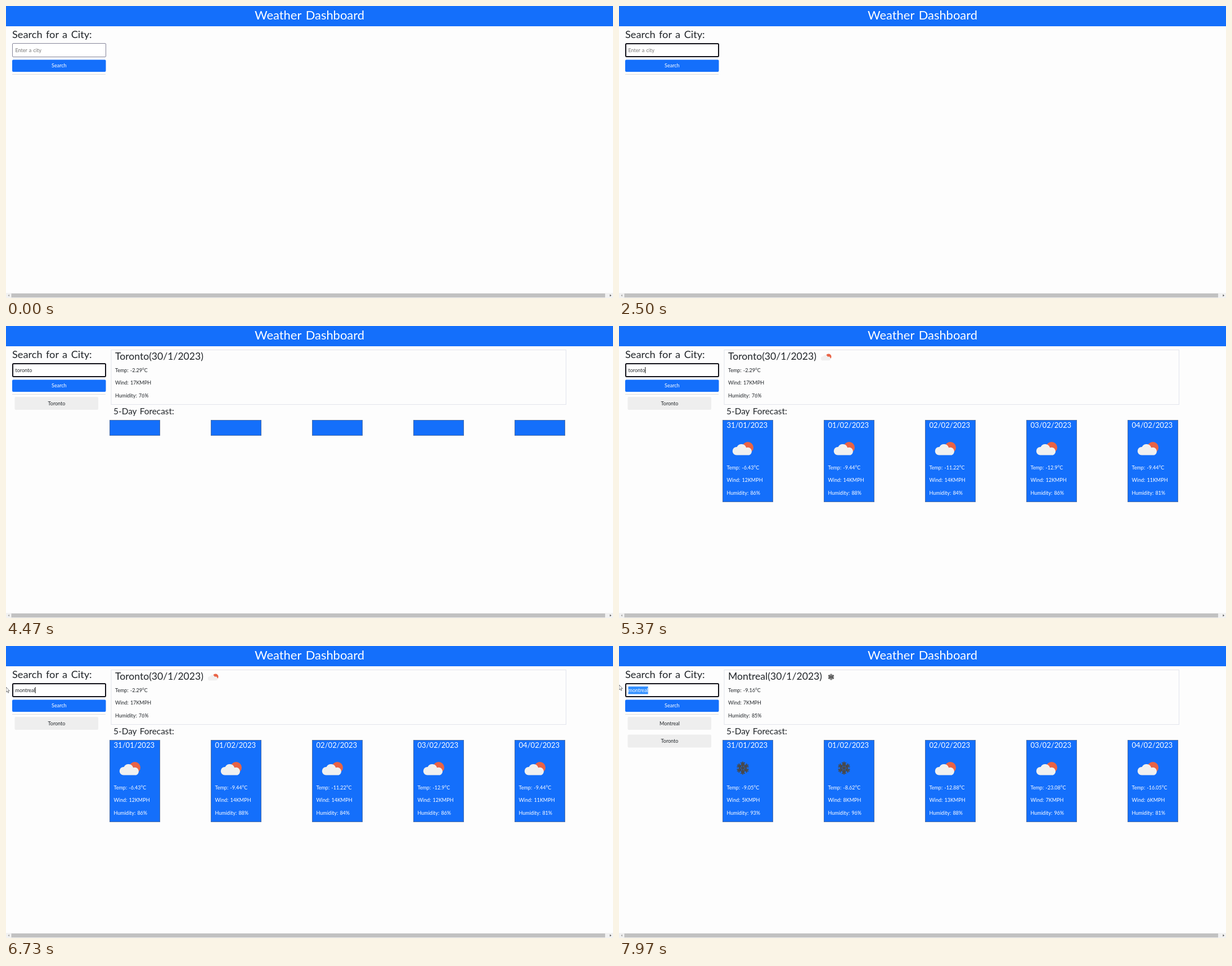
An HTML page for the animation above (8 s loop, 1079 px wide and 519 px high).

```html
<!DOCTYPE html>
<html lang="en">
<head>
<meta charset="utf-8">
<title>Weather Dashboard</title>
<style>
  html, body { margin: 0; width: 100%; height: 100%; overflow: hidden; background: #fdfdfd; }
  svg { display: block; width: 1079px; height: 519px; }
  text { font: 9px Lato, "Open Sans", sans-serif; word-spacing: .1em; fill: #212529; white-space: pre; }
  .mid { text-anchor: middle; }
  .white { fill: #fff; }
  .h1 { font-size: 21.9px; }
  .h2 { font-size: 18.2px; }
  .title { font-size: 17.6px; }
  .h3 { font-size: 15.4px; }
  .date { font-size: 13.1px; }
  .blue { fill: #146ffb; }
</style>
</head>
<body>
<svg viewBox="0 0 1079 519">
  <defs>
    <g id="cloud">
      <circle cx="9" cy="-1" r="10" fill="#e96345"/>
      <path d="M-11 12.500a7 7 0 0 1 0-14.500h.6a9 9 0 0 1 16.600 1.300 6.800 6.800 0 0 1 5.300 13.200z" fill="#f0f0f0"/>
    </g>
    <g id="snow" fill="none" stroke="#484848" stroke-width="2"></g>
  </defs>
  <rect class="blue" width="1079" height="36"/>
  <text class="h1 mid white" x="539.500" y="23.500">Weather Dashboard</text>
  <text class="h2" x="11" y="57">Search for a City:</text>
  <rect id="field" fill="#fff" rx="1.500"/>
  <rect id="mark" y="72" height="13.500" fill="#3390ff"/>
  <text id="typed" x="16.500" y="81.500"></text>
  <rect id="caret" y="73" width="1" height="11" fill="#111"/>
  <rect class="blue" x="11" y="95.500" width="166.500" height="21.500" rx="2"/>
  <text class="mid white" x="94.300" y="109">Search</text>
  <path d="M11 121.500H177" stroke="#dedede"/>
  <g id="results"></g>
  <rect y="510" width="1079" height="9" fill="#f1f1f1"/>
  <rect x="9.500" y="511" width="1055.500" height="7" fill="#c1c1c1"/>
  <path d="M6 512.500v4l-2.500-2z" fill="#a3a3a3"/>
  <path d="M1073.500 512.500v4l2.500-2z" fill="#505050"/>
  <path id="pointer" d="M0 0V9L2.200 7.200 3.700 10.300 5 9.700 3.600 6.700H6.300Z" fill="#fff" stroke="#555" stroke-width=".8"/>
</svg>
<script>
const LOOP = 8000;
const $ = id => document.getElementById(id);
const set = (el, attrs) => { for (const k in attrs) el.setAttribute(k, attrs[k]); };
const clamp = v => Math.max(0, Math.min(1, v));

const dates = ['31/01/2023', '01/02/2023', '02/02/2023', '03/02/2023', '04/02/2023'];
// Each reading: temperature, wind, humidity, icon
const toronto = {
  name: 'Toronto', now: [-2.29, 17, 76, 'cloud'],
  days: [[-6.43, 12, 86, 'cloud'], [-9.44, 14, 88, 'cloud'], [-11.22, 14, 84, 'cloud'],
         [-12.9, 12, 86, 'cloud'], [-9.44, 11, 81, 'cloud']]
};
const montreal = {
  name: 'Montreal', now: [-9.16, 7, 85, 'snow'],
  days: [['-9.05', 5, 93, 'snow'], [-8.62, 8, 96, 'snow'], [-12.88, 13, 88, 'cloud'],
         [-23.08, 7, 96, 'cloud'], [-16.05, 6, 81, 'cloud']]
};

const searches = [
  { word: 'toronto', keys: [3100, 3200, 3370, 3400, 3570, 3700, 3900], select: [5430, 5600] },
  { word: 'montreal', keys: [6200, 6270, 6330, 6500, 6570, 6630, 6680, 6730], select: [7700, 7930] }
];
const caretOn = [[2000, 2500], [3030, 4430], [4970, 5430], [6200, 7250]];
// Pointer trips as [time, x, y]; over the text field it is hidden
const trips = [
  [[370, 470, 505], [700, 276, 206], [970, 276, 206], [1070, 259, 192], [1200, 259, 192], [1770, 120, 92], [1800, 118, 90]],
  [[5560, 8, 75], [5630, 0, 73], [7330, 0, 73], [7430, 10, 76]],
  [[7870, 9, 73], [7960, 0, 69], [8000, 0, 69]]
];

let flake = '';
for (let a = 0; a < 360; a += 60)
  flake += `<path d="M0 0V-11.500M-3.500-10L0-6.500 3.500-10M-3-6.500L0-3.500 3-6.500" transform="rotate(${a})"/>`;
$('snow').innerHTML = flake;

const text = (x, y, s, cls = '') => `<text class="${cls}" x="${x}" y="${y}">${s}</text>`;
const icon = (id, x, y, scale) => `<use href="#${id}" transform="translate(${x} ${y}) scale(${scale})"/>`;
const readings = (x, y, [temp, wind, humidity], cls) =>
  [`Temp: ${temp}°C`, `Wind: ${wind}KMPH`, `Humidity: ${humidity}%`]
    .map((s, i) => text(x, y + i * 22.5, s, cls)).join('');

function card(day, i, filled, icons) {
  const x = 184 + i * 180, drop = icons ? 0 : -43;
  let out = `<rect class="blue" x="${x + .5}" y="167.500" width="89" height="${filled ? 145 + drop : 27}" stroke="#4a6ea8"/>`;
  if (filled) out += text(x + 7.5, 181, dates[i], 'date white') + readings(x + 7.5, 254.5 + drop, day, 'white');
  if (icons) out += icon(day[3], x + 36, 217, 1);
  return out;
}

function results(city, history, filled, icons) {
  const title = `${city.name}(30/1/2023)`;
  return history.map((name, i) =>
      `<rect x="15.500" y="${126 + i * 31.5}" width="148.500" height="23" rx="2" fill="#eee"/>` +
      text(90, 140.5 + i * 31.5, name, 'mid')).join('') +
    '<rect x="187" y="42.500" width="808.500" height="97" fill="none" stroke="#e2e4ec"/>' +
    text(194, 60, title, 'title') + readings(194, 81.5, city.now) +
    (icons ? icon(city.now[3], city === toronto ? 368 : 377, 55, .5) : '') +
    text(191, 156.5, '5-Day Forecast:', 'h3') +
    city.days.map((day, i) => card(day, i, filled, icons)).join('');
}

const stages = [
  [0, ''],
  [4430, results(toronto, ['Toronto'], false, false)],
  [4530, results(toronto, ['Toronto'], true, false)],
  [4970, results(toronto, ['Toronto'], true, true)],
  [7270, results(montreal, ['Montreal', 'Toronto'], true, true)]
];
let shown;

function drawField(t) {
  const focus = t >= 2000;
  set($('field'), focus
    ? { x: 12, y: 67, width: 165, height: 23, stroke: '#101018', 'stroke-width': 2 }
    : { x: 11.5, y: 66.5, width: 166, height: 24, stroke: '#85859a', 'stroke-width': 1 });

  const search = searches.findLast(s => t >= s.keys[0]);
  const label = $('typed');
  const typed = search ? search.word.slice(0, search.keys.filter(k => t >= k).length) : '';
  label.textContent = typed || 'Enter a city';
  const end = 16.5 + (typed ? label.getComputedTextLength() : 0);

  let marked = 0;
  if (search) {
    const [from, to] = search.select;
    marked = Math.round(clamp((t - from) / (to - from)) * typed.length);
  }
  const kept = typed.length - marked;
  const start = marked && kept ? 16.5 + label.getSubStringLength(0, kept) : 16.5;
  set($('mark'), { x: start, width: marked ? end - start : 0 });
  if (marked) label.innerHTML = `${typed.slice(0, kept)}<tspan fill="#fff">${typed.slice(kept)}</tspan>`;
  label.style.fill = typed ? '#212529' : '#757575';

  const visible = !marked && caretOn.some(([a, b]) => t >= a && t < b);
  set($('caret'), { x: end, opacity: visible ? 1 : 0 });
}

function drawPointer(t) {
  const trip = trips.find(p => t >= p[0][0] && t < p.at(-1)[0]);
  $('pointer').style.display = trip ? '' : 'none';
  if (!trip) return;
  const i = trip.findLastIndex(p => t >= p[0]);
  const [t0, x0, y0] = trip[i], [t1, x1, y1] = trip[i + 1];
  const u = (t - t0) / (t1 - t0), e = u * u * (3 - 2 * u);
  set($('pointer'), { transform: `translate(${x0 + (x1 - x0) * e} ${y0 + (y1 - y0) * e})` });
}

function draw() {
  const t = performance.now() % LOOP;
  const stage = stages.findLast(s => t >= s[0]);
  if (stage !== shown) $('results').innerHTML = (shown = stage)[1];
  drawField(t);
  drawPointer(t);
  requestAnimationFrame(draw);
}
draw();
</script>
</body>
</html>
```
